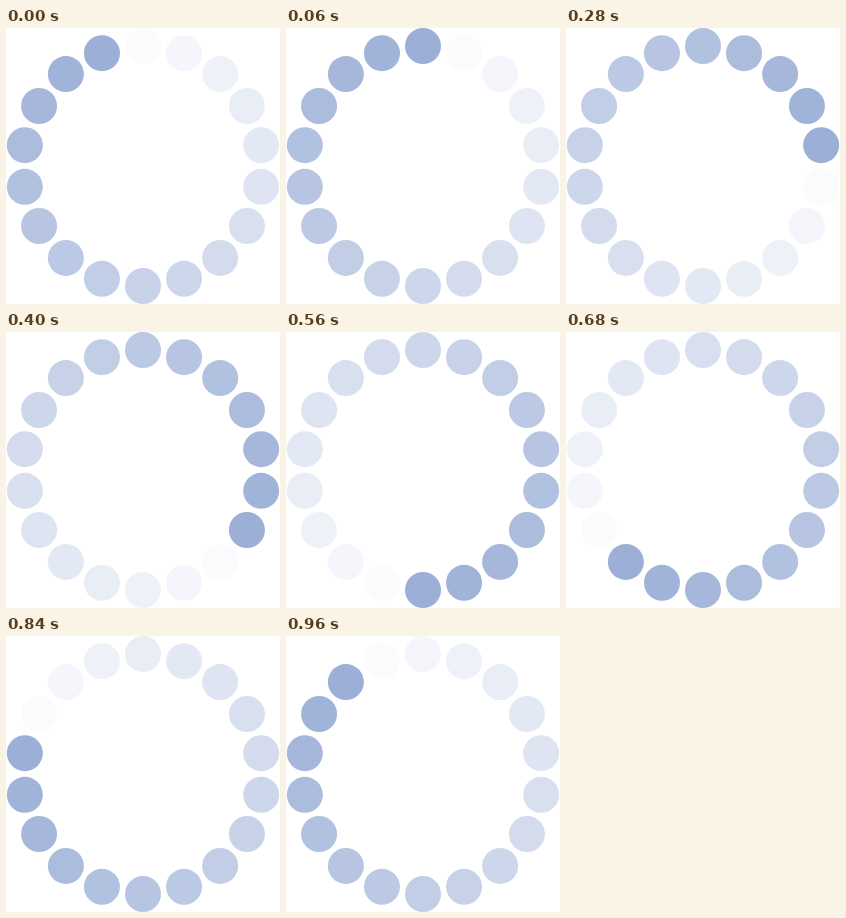
An HTML page that plays this animation: 274 by 276 pixels, repeating every 1 s.

```html
<!DOCTYPE html>
<html lang="en">
<head>
<meta charset="utf-8">
<title>Spinner</title>
<style>
  html, body { margin: 0; width: 100%; height: 100%; overflow: hidden; background: #fff; }
  svg { display: block; width: 274px; height: 276px; fill: #9bafd7; }
</style>
</head>
<body>
<svg viewBox="0 0 274 276"></svg>
<script>
const COUNT = 18, LOOP = 1000;
const svg = document.querySelector('svg');

const dots = Array.from({ length: COUNT }, (_, i) => {
  const angle = i / COUNT * 2 * Math.PI;
  const dot = document.createElementNS('http://www.w3.org/2000/svg', 'circle');
  dot.setAttribute('cx', 137 + 120 * Math.sin(angle));
  dot.setAttribute('cy', 138 - 120 * Math.cos(angle));
  dot.setAttribute('r', 18);
  return svg.appendChild(dot);
});

// The palest dot steps clockwise; opacity rises around the ring to the dot behind it.
function draw(time) {
  const palest = Math.floor(time % LOOP / LOOP * COUNT);
  dots.forEach((dot, i) => {
    dot.style.opacity = ((i - palest + COUNT) % COUNT + 1) / COUNT;
  });
}

// Opacity falls with distance behind the leading dot.
function shade(time) {
  const palest = Math.floor(time % LOOP / LOOP * COUNT);
  dots.forEach((dot, i) => {
    const behind = (palest - 1 - i + 2 * COUNT) % COUNT;
    dot.style.opacity = (COUNT - behind) / COUNT;
  });
}

const start = performance.now();
function tick(now) {
  shade(Math.max(0, now - start));
  requestAnimationFrame(tick);
}
shade(0);
requestAnimationFrame(tick);
</script>
</body>
</html>
```
